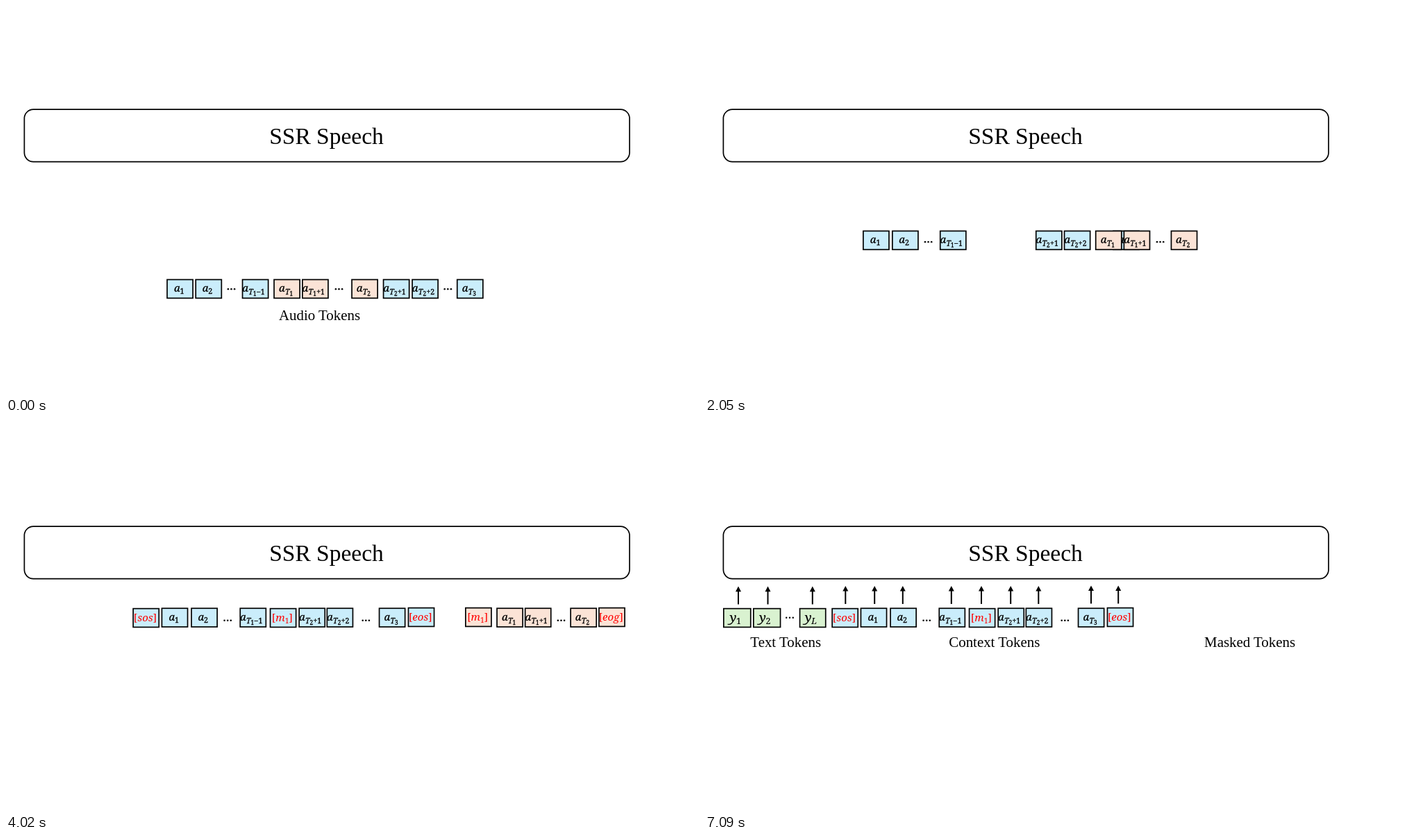
Recreate the animation shown at these times as an HTML page. Size 998 px wide and 561 px high, loop 8000 ms.

```html
<!DOCTYPE html>
<html lang="en">
<head>
<meta charset="utf-8">
<title>Speech token rearrangement</title>
<style>
  html, body { margin: 0; width: 100%; height: 100%; overflow: hidden; background: #fff; }
  svg { display: block; width: 998px; height: 561px; }
  .box { stroke: #000; stroke-width: 1.7; }
  .label { font-family: "Liberation Serif", "Times New Roman", serif; text-anchor: middle; font-size: 20.9px; }
  .math { font-family: "Noto Serif", serif; font-style: italic; font-size: 15px; stroke: #000; stroke-width: .3; }
  .up { font-style: normal; }
  .mark { fill: #f00; stroke: none; text-anchor: middle; }
  .y { font-size: 18.5px; stroke-width: .15; }
</style>
</head>
<body>
<svg id="stage" viewBox="0 0 998 561">
  <rect x="26.4" y="149.2" width="871.6" height="75.4" rx="13" fill="none" stroke="#000" stroke-width="1.7"/>
  <text class="label" x="461.5" y="198.7" style="font-size:33.5px">SSR Speech</text>
</svg>
<script>
const LOOP = 8000, STEP = 40;
const BLUE = '#CAEDFB', PINK = '#FBE3D6', GREEN = '#D9F2D0';
const stage = document.getElementById('stage');
const timed = [], movers = [];

function add(parent, tag, attrs, text) {
  const el = document.createElementNS('http://www.w3.org/2000/svg', tag);
  for (const key in attrs) el.setAttribute(key, attrs[key]);
  if (text) el.textContent = text;
  parent.append(el);
  return el;
}

// A group that is visible from `from` until `to`.
function group(from, to) {
  const el = add(stage, 'g', {});
  timed.push({ el, from, to });
  return el;
}

function mover(parent, x0, y0, x1, y1) {
  const el = add(parent, 'g', {});
  movers.push({ el, x0, y0, x1, y1 });
  return el;
}

function box(parent, x, y, fill, w = 38.8) {
  add(parent, 'rect', { class: 'box', x: x + .85, y: y + .85, width: w - 1.7, height: 26.8, fill });
}

function dots(parent, x, y, gap = 4.6, r = 1.3) {
  for (const i of [-1, 0, 1]) add(parent, 'circle', { cx: x + i * gap, cy: y, r });
}

// Label pieces: [text, x, y, size, upright]
function pieces(parent, cls, x, y, list) {
  const el = add(parent, 'text', { class: cls });
  for (const [text, dx, dy, size, up] of list)
    add(el, 'tspan', { x: x + dx, y: y + dy, 'font-size': size, class: up ? 'up' : '' }, text);
}

function audioToken(parent, fill, x0, x1, inset, sub, tail) {
  const g = mover(parent, x0, 393.7, x1, 266.4);
  box(g, 0, 0, fill);
  const list = [['a', 0, 0, 15]];
  if (sub[0] === 'T') {
    list.push(['T', 9, 4, 10.5], [sub[1], 15.6, 6, 8.2, true]);
    if (tail) list.push([tail, 20.6, 4, 10.5, true]);
  } else list.push([sub, 8.6, 3, 10.8, true]);
  pieces(g, 'math', inset, 18.7, list);
}

function markToken(parent, fill, x, y, name, sub) {
  box(parent, x, y, fill);
  const el = add(parent, 'text', { class: 'math mark', x: x + 18.2, y: y + 19 });
  add(el, 'tspan', { class: 'up' }, '[');
  add(el, 'tspan', {}, name);
  if (sub) add(el, 'tspan', { class: 'up', dy: 3, 'font-size': 10.5 }, sub);
  add(el, 'tspan', { class: 'up', dy: sub ? -3 : 0 }, ']');
}

function arrows(parent, y, xs) {
  for (const x of xs)
    add(parent, 'path', { d: `M${x - 4} ${y + 7.6}L${x} ${y}L${x + 4} ${y + 7.6}H${x + 1}V${y + 26}H${x - 1}V${y + 7.6}Z` });
}

const caption = (parent, x, y, text) => add(parent, 'text', { class: 'label', x, y }, text);

// Context tokens stay underneath the masked ones while they cross.
const context = group(0, LOOP);
audioToken(context, BLUE, 231.2, 223.6, 10.8, '1');
audioToken(context, BLUE, 272.4, 266.2, 10.3, '2');
dots(mover(context, 324.5, 408.2, 319.2, 284.8), 0, 0);
audioToken(context, BLUE, 339.7, 336.4, .6, 'T1', '−1');
audioToken(context, BLUE, 542.7, 421.3, .6, 'T2', '+1');
audioToken(context, BLUE, 584.2, 461.5, .6, 'T2', '+2');
dots(mover(context, 636.3, 408.2, 518.3, 284.8), 0, 0);
audioToken(context, BLUE, 648.9, 536.7, 7.8, 'T3');

const masked = group(0, 7090);
audioToken(masked, PINK, 385.2, 706.2, 7.8, 'T1');
audioToken(masked, PINK, 426, 746.8, .6, 'T1', '+1');
dots(mover(masked, 479.5, 408.2, 799.5, 284.8), 0, 0);
audioToken(masked, PINK, 497.2, 812.3, 7.5, 'T2');

caption(group(0, 1050), 451.5, 452.6, 'Audio Tokens');

const contextMarks = group(4020, LOOP);
markToken(contextMarks, BLUE, 182.3, 266.8, 'sos');
markToken(contextMarks, BLUE, 379.7, 266.8, 'm', '1');
markToken(contextMarks, BLUE, 578.6, 265.8, 'eos');

const maskedMarks = group(4020, 7090);
markToken(maskedMarks, PINK, 661, 265.8, 'm', '1');
markToken(maskedMarks, PINK, 853.1, 265.8, 'eog');

const textTokens = group(5030, LOOP);
[[26, 40.6, 9.5, '1'], [69, 40.4, 9, '2'], [135.7, 38.9, 8, 'L']].forEach(([x, w, inset, sub]) => {
  box(textTokens, x, 266.8, GREEN, w);
  pieces(textTokens, 'math y', x + inset, 286.8, [['y', 0, 0, 18.5], [sub, 9.6, 3.2, 12.5, sub !== 'L']]);
});
dots(textTokens, 122, 280.8, 4.8, 1.2);

const inputs = group(6080, LOOP);
arrows(inputs, 235.6, [48, 90.5, 154.8]);
arrows(inputs, 235, [202.3, 244.2, 284.8, 354.8, 398, 440.2, 480.3]);
arrows(inputs, 234.4, [556, 595.2]);
caption(inputs, 116.2, 322.8, 'Text Tokens');
caption(inputs, 416.8, 322.8, 'Context Tokens');
caption(inputs, 784.6, 322.8, 'Masked Tokens');
arrows(group(6080, 7090), 234.9, [678.8, 723, 766.2, 832, 872.2]);

// Smootherstep, sampled at the picture rate of the move.
function progress(t) {
  const held = 1050 + Math.floor((t - 1050) / STEP) * STEP;
  const p = Math.min(1, Math.max(0, (held - 1070) / 1860));
  return p * p * p * (p * (p * 6 - 15) + 10);
}

function draw(now) {
  const t = now % LOOP, k = progress(t);
  for (const { el, from, to } of timed)
    el.style.display = t >= from && t < to ? '' : 'none';
  for (const { el, x0, y0, x1, y1 } of movers)
    el.setAttribute('transform', `translate(${x0 + (x1 - x0) * k} ${y0 + (y1 - y0) * k})`);
}

const start = performance.now();
function tick() {
  draw(performance.now() - start);
  requestAnimationFrame(tick);
}
tick();
</script>
</body>
</html>
```
